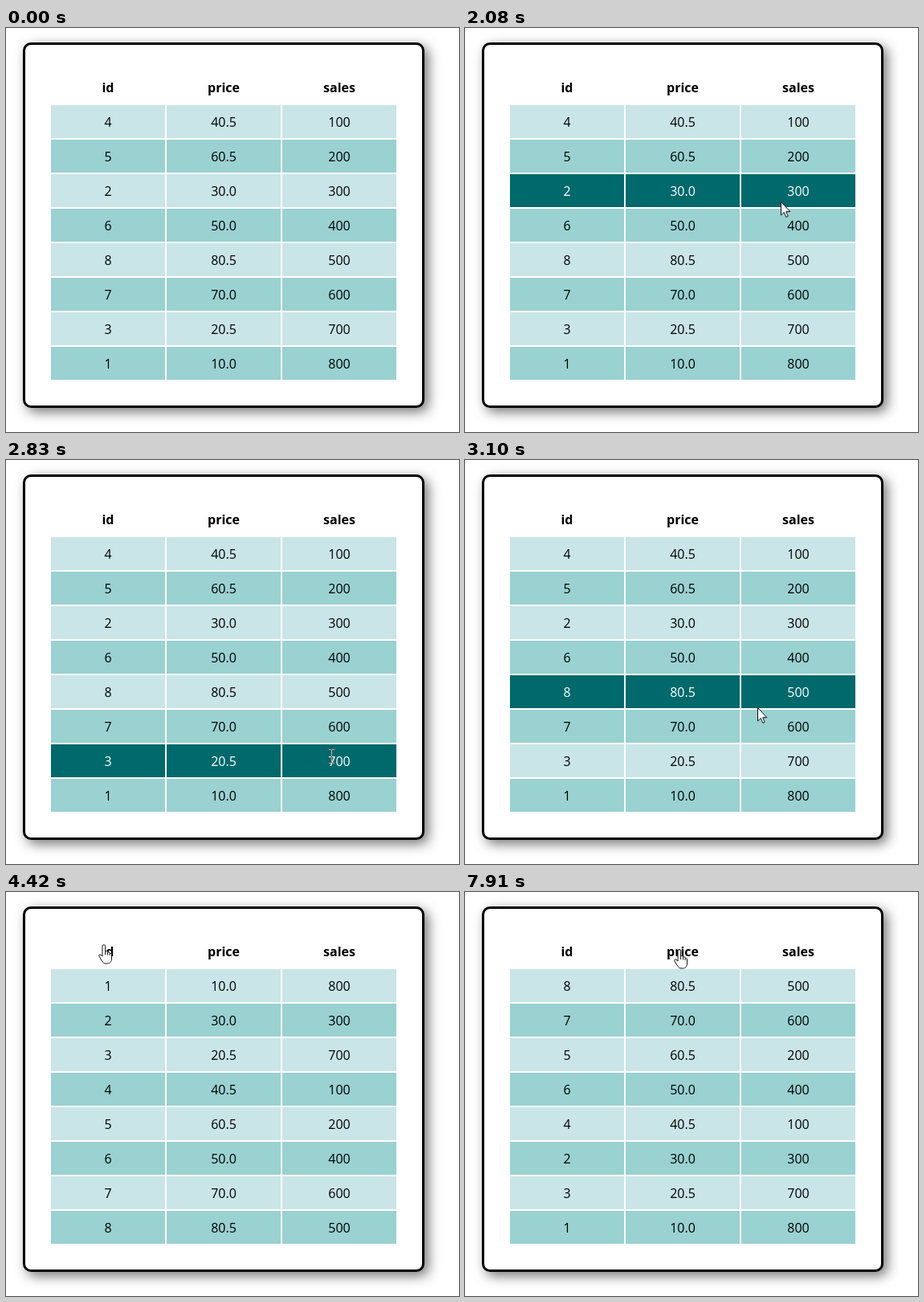
Write an HTML page that moves like this. It is 564 px wide and 503 px high and loops after 8 s.

```html
<!DOCTYPE html>
<html lang="en">
<head>
<meta charset="utf-8">
<title>Sortable table</title>
<style>
html, body { margin: 0; width: 100%; height: 100%; overflow: hidden; background: #fff; }
#card {
  position: absolute; left: 21px; top: 18px; width: 500px; height: 455px;
  box-sizing: border-box; border: 3px solid #000; border-radius: 10px;
  background: #fff; box-shadow: 5px 5px 15px #777;
}
svg { position: absolute; left: 0; top: 0; }
text { font: 16px "Open Sans", "Noto Sans", sans-serif; text-anchor: middle; }
text.head { font-weight: 700; }
#arrow, #hand { fill: #fff; stroke: #111; stroke-linejoin: round; }
#beam { fill: none; stroke: #fff; mix-blend-mode: difference; }
</style>
</head>
<body>
<div id="card"></div>
<svg width="564" height="503">
  <g id="table"></g>
  <path id="arrow" d="M.5.5V17L4.2 13.4 6.8 19.4 9.2 18.4 6.7 12.6H11.8Z"/>
  <path id="hand" d="M-1 15V2.5a1.8 1.8 0 0 1 3.6 0V9.5c.4-1.6 3-1.4 3 .4v.6c.4-1.2 2.6-1 2.6.6v.8c.5-.9 2.3-.7 2.3 1v5.1c0 3.5-2 6-5 6h-2.5c-2 0-3.2-1-4.2-2.8L-5.2 14.8c-.6-1.2.8-2.6 2.2-1.6zM2.6 9.5v3.5M5.6 10.5v3M8.2 11.9v2"/>
  <path id="beam" d="M-3-7.5H0M1-7.5H4M.5-7V9M-3 9.5H0M1 9.5H4"/>
</svg>
<script>
const LOOP = 8000, STEP = 140, LEFT = 56, RIGHT = 486, TOP = 96, COL = 144, ROW = 43;
const LIGHT = '#c9e5e8', MID = '#9ad1d1', DARK = '#00696b';

const ids = [4, 5, 2, 6, 8, 7, 3, 1];
const prices = [10, 30, 20.5, 40.5, 60.5, 50, 70, 80.5];
const rows = ids.map((id, i) => [id, prices[id - 1], 100 * (i + 1)]);
const sorted = (key, dir) => [...rows].sort((a, b) => dir * (a[key] - b[key]));

// Each click re-sorts the table.
const orders = [[0, rows], [4420, sorted(0, 1)], [6260, sorted(1, 1)], [7910, sorted(1, -1)]];

// Turning points of the pointer: time, x, y
const path = [
  [580, 525, 7], [1420, 384, 105], [2080, 393, 216], [2680, 402, 351], [2830, 405, 368],
  [3410, 242, 126], [3870, 116, 60], [4140, 121, 65], [4830, 121, 65], [5580, 266, 71]
];

const table = document.getElementById('table');
const cursors = ['arrow', 'hand', 'beam'].map(id => document.getElementById(id));

function add(name, attrs, content = '') {
  const el = document.createElementNS('http://www.w3.org/2000/svg', name);
  for (const k in attrs) el.setAttribute(k, attrs[k]);
  el.textContent = content;
  return table.appendChild(el);
}

const midX = c => LEFT + COL * c + 71;
['id', 'price', 'sales'].forEach((s, c) => add('text', { x: midX(c), y: 80, class: 'head' }, s));

const cells = rows.map((_, r) => [0, 1, 2].map(c => ({
  box: add('rect', { x: LEFT + COL * c, y: TOP + ROW * r, width: 142, height: 41 }),
  label: add('text', { x: midX(c), y: TOP + ROW * r + 27 })
})));

// Straight runs between turning points, sampled in even steps.
function pointer(t) {
  const i = path.findLastIndex(p => p[0] <= t);
  if (i < 0) return null;
  const [t0, x0, y0] = path[i], [t1, x1, y1] = path[i + 1] || [LOOP, x0, y0];
  const n = Math.round((t1 - t0) / STEP);
  const u = Math.floor((t - t0) / (t1 - t0) * n) / n;
  return [Math.round(x0 + (x1 - x0) * u), Math.round(y0 + (y1 - y0) * u)];
}

function cursorAt(x, y) {
  if (x < LEFT || x >= RIGHT) return 'arrow';
  if (y > 53 && y < 95) return 'hand';
  const dx = Math.abs((x - LEFT) % COL - 71);
  const dy = Math.abs((y - TOP) % ROW - 21);
  return y >= TOP && dx < 14 && dy < 11 ? 'beam' : 'arrow';
}

function draw(t) {
  const pos = pointer(t);
  const hover = t >= 1540 ? Math.floor((pos[1] - TOP) / ROW) : -1;
  const data = orders.findLast(o => o[0] <= t)[1];

  cells.forEach((line, r) => line.forEach(({ box, label }, c) => {
    const on = r === hover, value = data[r][c];
    box.style.fill = on ? DARK : r % 2 ? MID : LIGHT;
    label.style.fill = on ? '#fff' : '#000';
    label.textContent = c === 1 ? value.toFixed(1) : value;
  }));

  const shape = pos && cursorAt(...pos);
  for (const el of cursors) {
    el.style.display = el.id === shape ? '' : 'none';
    if (pos) el.setAttribute('transform', `translate(${pos})`);
  }
}

function tick() {
  draw(performance.now() % LOOP);
  requestAnimationFrame(tick);
}
tick();
</script>
</body>
</html>
```
